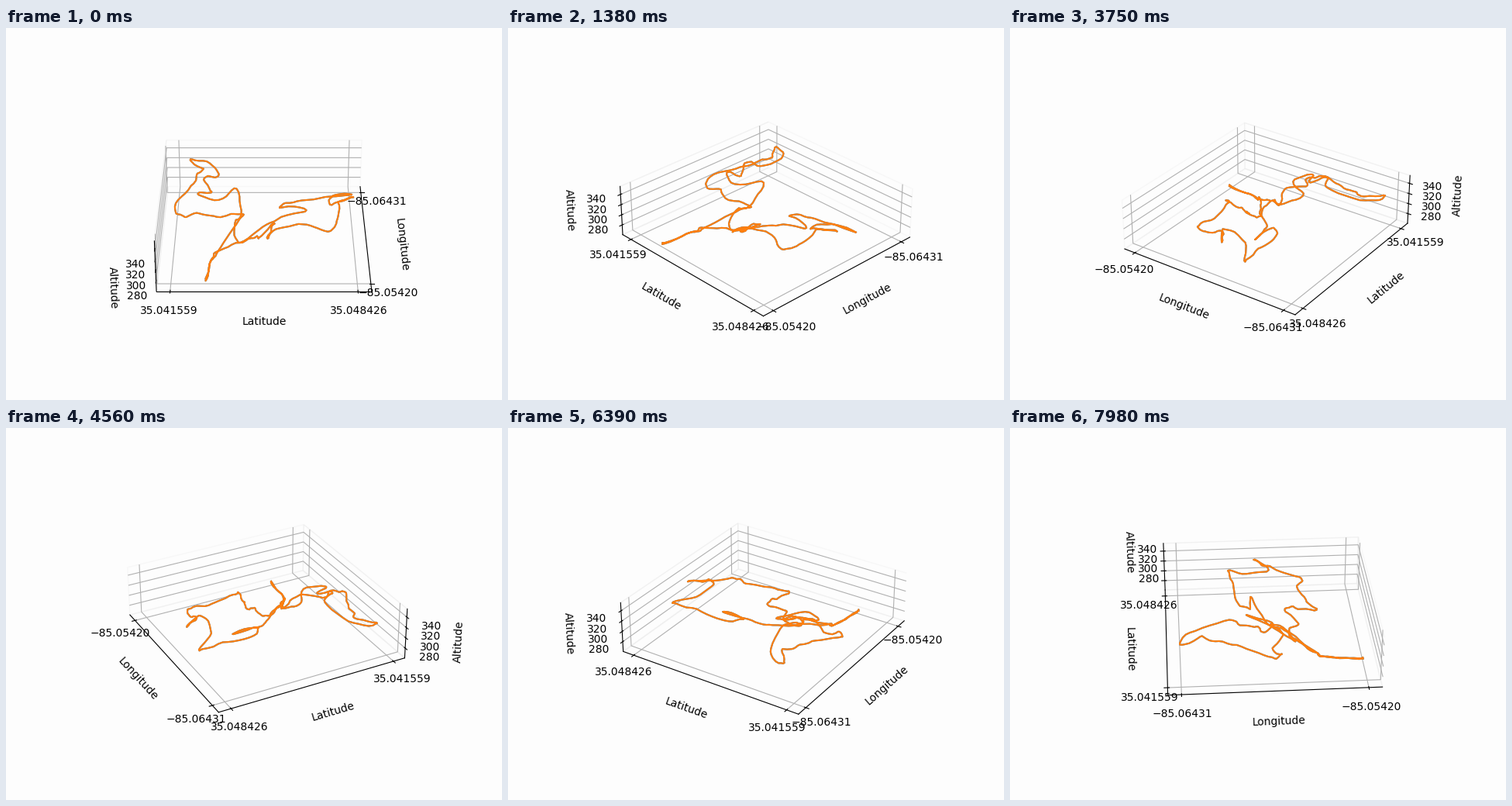
Animation, 640 px wide and 480 px high, one loop 8 s. Source, as a matplotlib script:

```python
import numpy as np
import matplotlib.pyplot as plt
from matplotlib.animation import FuncAnimation

FRAMES, INTERVAL, STEP_MS = 400, 20, 30

LON = (-85.06431, -85.05420)
LAT = (35.041559, 35.048426)
ALT = (266.7, 349.5)
HALF = np.array([57.7, 57.7, 15.8])    # half size of the track in route units
MARGIN = 1.1 * 25 / 24
PAPER = "#fdfdfd"

# Key bends (east, north, up) of a walk with two loops on one shared trail
START = [(58, -36, -16), (35, -33, -15), (27, -29, -13)]
LINK = [(10, -18, -3), (1, -15, -1)]
WEST = [(8, -30, 1), (0, -44, -1), (4, -53, -1), (-4, -58, 2),
        (-23, -48, 5), (-38, -44, 6), (-45, -41, 8), (-58, -50, 7),
        (-51, -36, 8), (-27, -30, 12), (-20, -39, 14), (-10, -34, 9),
        (-6, -43, 11), (0, -29, 9), (-15, -18, 8)]
FORK = [(17, -16, -13)]
EAST = [(4, -3, -11), (-4, 8, -7), (-9, 28, -3), (-11, 10, -3),
        (-19, 19, -3), (-21, 40, -1), (-23, 58, 0), (-14, 45, 5),
        (3, 43, 8), (-6, 58, 8), (1, 48, 8), (14, 47, 3), (26, 40, 1),
        (21, 27, 3), (25, 10, 3), (31, 2, -1), (18, 5, 0), (11, 6, -2),
        (19, -3, -7), (13, -6, -11)]


def smooth_path(points, sub=6):
    """Catmull-Rom curve through the points."""
    p = np.array([points[0], *points, points[-1]], float)
    a, b, c, d = (p[i:len(p) - 3 + i, None] for i in range(4))
    t = (np.arange(sub) / sub)[None, :, None]
    curve = 0.5 * (2 * b + (c - a) * t + (2 * a - 5 * b + 4 * c - d) * t**2
                   + (3 * b - a - 3 * c + d) * t**3)
    return np.vstack([curve.reshape(-1, 3), p[-1]])


def wobble(path, size=0.7):
    noise = np.random.default_rng(4).normal(0, size, path.shape)
    noise[1:-1] = (noise[:-2] + 2 * noise[1:-1] + noise[2:]) / 4
    return np.clip(path + noise, -HALF, HALF)


def limits(lo, hi):
    mid, half = (lo + hi) / 2, (hi - lo) / 2 * MARGIN
    return mid - half, mid + half


def labels(values, digits):
    return [f"{v:.{digits}f}".replace("-", "\u2212") for v in values]


route = START + LINK + WEST + LINK[::-1] + FORK + EAST + FORK + START[::-1]
local = wobble(smooth_path(route)) / HALF
low, high = np.array([LON, LAT, ALT]).T
track = (low + high) / 2 + local * (high - low) / 2

fig = plt.figure(figsize=(6.4, 4.8), dpi=100, facecolor=PAPER)
ax = fig.add_subplot(projection="3d", facecolor=PAPER)
for color in ("C0", "C1"):
    ax.plot(*track.T, color=color)

ax.set(xlim=limits(*LON), ylim=limits(*LAT), zlim=limits(*ALT),
       xlabel="Longitude", ylabel="Latitude", zlabel="Altitude")
ax.set_xticks(LON, labels=labels(LON, 5))
ax.set_yticks(LAT, labels=labels(LAT, 6))
ax.set_zticks(range(280, 341, 20))
ax.set_box_aspect((1, 1, 0.272))
for axis in (ax.xaxis, ax.yaxis, ax.zaxis):
    axis.pane.fill = False


def update(i):
    """One degree of turn per 30 ms step."""
    ax.view_init(elev=30, azim=(i * INTERVAL + 10) // STEP_MS)
    return ()


anim = FuncAnimation(fig, update, frames=FRAMES, interval=INTERVAL,
                     init_func=lambda: update(0), repeat=True)
plt.show()
```
